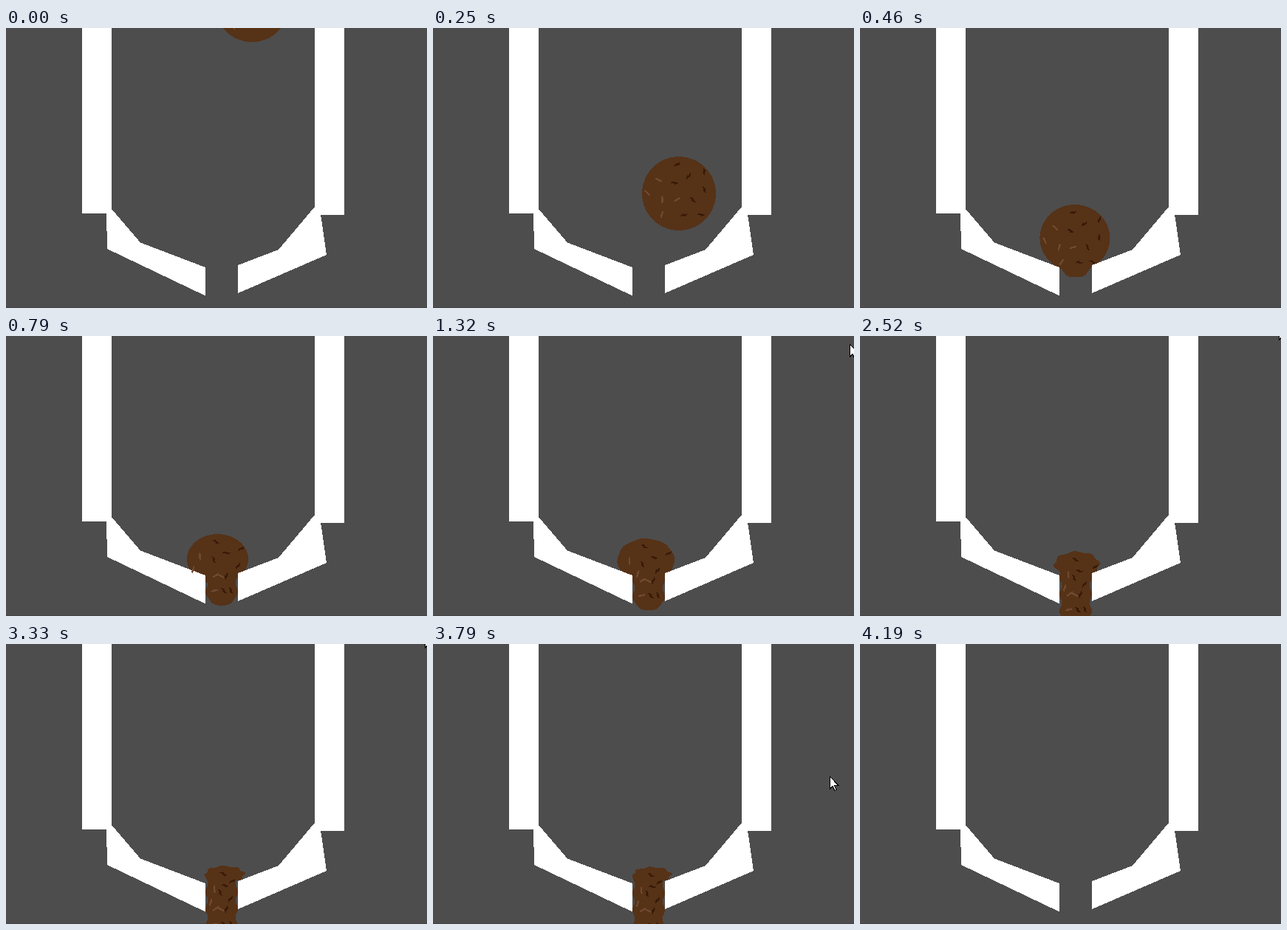
Animation, 570 px wide and 379 px high, one loop 4.91 s. Source, as an HTML page:

```html
<!DOCTYPE html>
<html lang="en">
<head>
<meta charset="utf-8">
<title>Soft ball through a funnel</title>
<style>
html, body { margin: 0; width: 100%; height: 100%; overflow: hidden; background: #4d4d4d; }
svg { display: block; shape-rendering: crispEdges; }
.blob { fill: #563217; }
.wall { fill: #fff; }
.dark { fill: #371a07; }
.light { fill: #704930; }
#pointer { fill: #fff; stroke: #000; stroke-width: 1; }
</style>
</head>
<body>
<svg width="570" height="379" viewBox="0 0 570 379">
  <path d="M0 378h570v1H0z" fill="#434343"/>
  <path id="head" class="blob"/>
  <g class="wall">
    <path d="M103 0H143V251H103z"/>
    <path d="M418 0H458V253H418z"/>
    <path d="M143 245 182 290.5 270 324V362.5L137 299 136 250H143z"/>
    <path d="M418 242 369 300 314 321V359L434 307 426 252H418z"/>
  </g>
  <path id="stem" class="blob"/>
  <g id="flecks"></g>
  <path id="pointer" d="M.5 .5V17L4 13.5 7 19.5 9 18.5 6.5 12.5H12z"/>
</svg>
<script>
const LOOP = 4910, LAND = 325, SINK = 400, SQUEEZED = 790, RELEASE = 3788, GONE = 4180;
const GAP_X = 292, LIP_Y = 316, RADIUS = 50, FLECKS = 13;
const FLECK_SHAPE = {
  dark: 'M-5 2-3-1 0-2 1-1 5-2 4 0 1 2 0 1-2 1z',
  light: 'M-5 1-2-1 5-2 5 0 1 1-3 2z'
};
// time, x, y
const POINTER = [[520, 545, 368], [720, 572, 300], [990, 572, 40], [1320, 564, 12],
  [1590, 567, -12], [3600, 567, -12], [3990, 505, 385]];

const el = id => document.getElementById(id);
const lerp = (a, b, p) => a + (b - a) * p;
const clamp = (v, lo, hi) => Math.min(hi, Math.max(lo, v));
const part = (t, from, to) => clamp((t - from) / (to - from), 0, 1);
const smooth = p => p * p * (3 - 2 * p);
const outline = points => 'M' + points.map(p => p.map(v => v.toFixed(2)).join(' ')).join('L') + 'z';

// The picture advances about fifteen times a second
const stepAt = t => t < 330
  ? clamp(Math.floor((t - 10) / 60), 0, 4)
  : 5 + Math.floor((t - 320) / 66.5);
const stepTime = n => n < 5 ? n * 65 : 330 + (n - 5) * 66.5;

// Free fall, then a roll off the right ramp onto the gap
function ballAt(n, t) {
  if (n < 5) return { x: 333, y: -31 + 55 * n + 2.19 * n * n };
  const p = smooth(part(t, LAND, LAND + 150));
  return { x: lerp(333, GAP_X, p), y: lerp(264, 277, p) };
}

function blobAt(n, t) {
  const ball = ballAt(n, t);
  const squash = 1 - (1 - part(t, SINK, SQUEEZED)) ** 2;
  const p = part(t, SQUEEZED, RELEASE);
  const flow = 34 * (smooth(p) + Math.sin(p * Math.PI / 2)) / 2;
  const drop = 500 * (Math.max(0, t - RELEASE) / 1000) ** 2;
  const top = lerp(ball.y - RADIUS, 268 + flow, squash);
  const cy = lerp(ball.y, 302 + .3 * flow, squash);
  return {
    squash, flow,
    cx: lerp(ball.x, 286.5 + .3 * flow, squash),
    rx: lerp(RADIUS, 41.5 - .47 * flow, squash),
    ry: cy - top,
    cy: cy + drop,
    top: top + drop,
    tip: lerp(ball.y + RADIUS, 365 + 1.1 * flow, squash) + drop
  };
}

function headPath(b) {
  const points = [];
  for (let a = 0; a < 2 * Math.PI; a += Math.PI / 36) {
    const r = 1 + .0022 * b.flow * Math.cos(8 * a + 1);
    points.push([b.cx + b.rx * r * Math.cos(a), b.cy + b.ry * r * Math.sin(a)]);
  }
  return outline(points);
}

function stemPath(b) {
  const left = [], right = [];
  for (let y = b.cy; y <= b.tip; y++) {
    const d = b.tip - y;
    const wave = Math.cos((d - 19) * 2 * Math.PI / 23);
    const half = (20.3 + 1.8 * wave) * Math.sqrt(1 - (1 - Math.min(1, d / 15)) ** 2);
    left.push([GAP_X - half, y]);
    right.unshift([GAP_X + half, y]);
  }
  return outline(left.concat(right));
}

// Middle and half width of the blob at height y
function spanAt(b, y) {
  const half = b.rx * Math.sqrt(Math.max(0, 1 - ((y - b.cy) / b.ry) ** 2));
  if (y < LIP_Y || !b.squash) return [b.cx, half];
  return [lerp(b.cx, GAP_X, b.squash), clamp(half, 17, lerp(RADIUS, 17, b.squash))];
}

const flecks = Array.from({ length: FLECKS }, (_, i) => {
  const kind = i * 5 % FLECKS < 5 ? 'light' : 'dark';
  const node = document.createElementNS('http://www.w3.org/2000/svg', 'path');
  node.setAttribute('class', kind);
  node.setAttribute('d', FLECK_SHAPE[kind]);
  el('flecks').append(node);
  // Sunflower spread; u runs across the width, v down the height
  const r = .92 * Math.sqrt((i + .5) / FLECKS), a = 1.9 + i * 2.4;
  const v = r * Math.sin(a);
  return { node, v, u: r * Math.cos(a) / Math.sqrt(1 - v * v), turn: i * 40 - 20 };
});

function placeFleck(f, b) {
  const y = lerp(b.top, b.tip, (f.v + 1) / 2);
  const [mid, half] = spanAt(b, y);
  const angle = f.turn + 60 * b.squash;
  f.node.setAttribute('transform', `translate(${mid + f.u * half} ${y}) rotate(${angle})`);
}

function placePointer(t) {
  const i = POINTER.findIndex(k => k[0] > t);
  el('pointer').style.display = i > 0 ? '' : 'none';
  if (i < 1) return;
  const [a, b] = [POINTER[i - 1], POINTER[i]];
  const p = part(t, a[0], b[0]);
  const [x, y] = [1, 2].map(c => Math.round(lerp(a[c], b[c], p)));
  el('pointer').setAttribute('transform', `translate(${x} ${y})`);
}

function draw(time) {
  const n = stepAt(time), t = stepTime(n);
  const b = blobAt(n, t);
  const alive = t < GONE;
  el('head').setAttribute('d', alive ? headPath(b) : '');
  el('stem').setAttribute('d', alive && b.squash ? stemPath(b) : '');
  el('flecks').style.display = alive ? '' : 'none';
  flecks.forEach(f => placeFleck(f, b));
  placePointer(t);
}

const start = performance.now();
function tick() {
  draw((performance.now() - start) % LOOP);
  requestAnimationFrame(tick);
}
tick();
</script>
</body>
</html>
```
